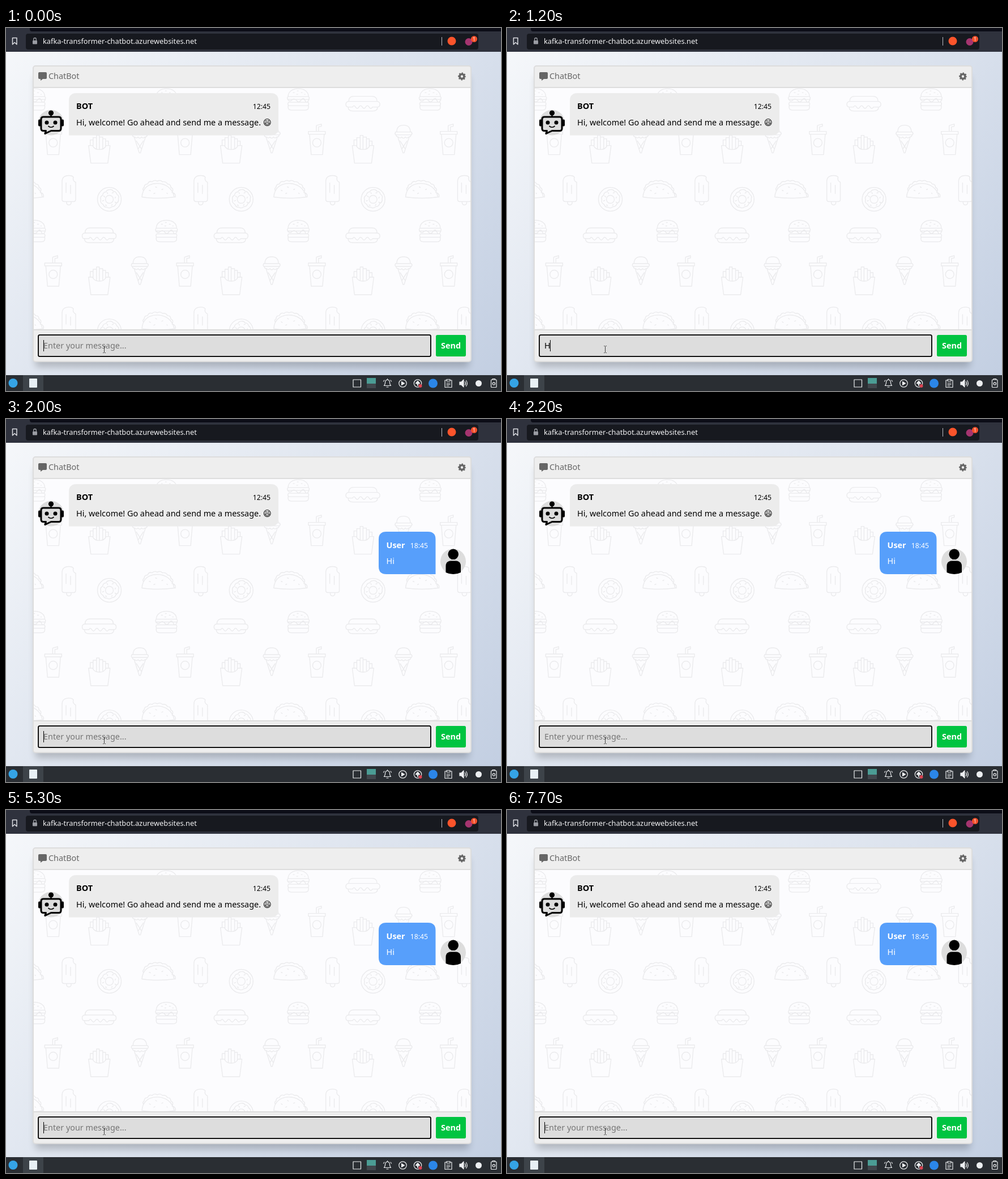
These frames come from a looping animation (874x641 px, 8000 ms). An HTML page:

```html
<!DOCTYPE html>
<html lang="en">
<head>
<meta charset="utf-8">
<title>ChatBot</title>
<style>
  html, body { margin: 0; width: 100%; height: 100%; overflow: hidden; background: #2a2e32; }
  svg { display: block; }
  text { font: 14.4px "Noto Sans", sans-serif; }
  .bold { font-weight: 700; }
  .time { font-size: 12.24px; text-anchor: end; }
  .emoji { font-family: "DejaVu Sans", sans-serif; }
  .line { fill: none; stroke-linecap: round; stroke-linejoin: round; }
</style>
</head>
<body>
<svg width="874" height="641" viewBox="0 0 874 641">
  <defs>
    <linearGradient id="sky" gradientUnits="userSpaceOnUse" x1="77" y1="-33" x2="797" y2="687">
      <stop offset="0" stop-color="#f5f7fa"/>
      <stop offset="1" stop-color="#c3cfe2"/>
    </linearGradient>
    <filter id="blur" x="-10%" y="-10%" width="120%" height="120%"><feGaussianBlur stdDeviation="6.5"/></filter>
    <clipPath id="chat"><rect x="49" y="106" width="771" height="426"/></clipPath>
    <g id="tile">
      <g transform="translate(283.3 358.5)">
        <path d="M-18-5C-18-14-10-19 0-19S18-14 18-5ZM-18-5q-3 3 0 5h36q3-2 0-5M-19 0q4 5 8 1t8 1 8-1 7 1 7-2M-17 5h34q3 3 0 6h-34q-3-3 0-6M-18 11h36v3q0 5-6 5h-24q-6 0-6-5Z"/>
        <path d="M-9-12h2M-2-15h2M5-12h2M-3-9h2M11-9h1"/>
      </g>
      <g transform="translate(164.5 366)">
        <path d="M-25-4q0-9 9-9h32q9 0 9 9M-24-4h48q6 0 6 5t-4 5q0 7-8 7h-36q-8 0-8-7-4 0-4-5t6-5Z"/>
        <path d="M-26 6h8q2-5 5 0t6 0 6 0 6 0 6 0 6 0h9"/>
      </g>
      <g transform="translate(83.3 429)">
        <path d="M-15-14h30v5h-30ZM-13-9l3 36h20l3-36M-1-14v-9q0-2 2-2l7-2v4l-5 1v8"/>
        <circle cy="6" r="7.5"/>
      </g>
      <g transform="translate(164.8 446)">
        <path d="M-19-6h7q3 7 12 7t12-7h7l-4 31h-30ZM-16-6v-10h5v11M-11-9v-11h6v20M-5-20v-4h5v25M0-21h6v21M6-18h5v14M11-14h5v8"/>
      </g>
      <g transform="translate(236.3 428)">
        <path d="M-12-12C-12-20-8-24 0-24S12-20 12-12M-14-12h28q2 3 0 5h-28q-2-2 0-5M-13-7q0 4 4 4 3 3 6 0 3 4 6 0 3 3 6 0 4 0 4-4M-10-3L-1 25h2L10-3M-6 4L3 18M6 4l-9 14"/>
      </g>
      <g transform="translate(111 285.5)">
        <path d="M-12 17v-31q0-11 12-11 6 0 8 3-2 6 4 9v30q0 4-4 4h-16q-4 0-4-4ZM-4 21v3q1 3 4 3t4-3v-3M-5-12v17M3-8v15"/>
      </g>
      <g transform="translate(182.5 302.5)">
        <circle r="21"/><circle r="7"/>
        <path d="M0-17q5-1 7 3 5 0 6 5 5 3 3 8 1 6-4 8-2 6-7 6-5 4-9 1-6 0-7-5-6-3-4-8-2-6 3-8 1-6 6-6 2-4 6-4Z"/>
        <path d="M-10-6l2 2M-4-12l1 2M5-11l2-1M11-4l-1 2M10 5l2 1M4 11l1-2M-5 11l-2-1M-12 3l2-1"/>
      </g>
      <g transform="translate(269 285.5)">
        <path d="M-29 13C-28-4-16-11-2-11S25-3 28 13q-28 4-57 0ZM-26 2q-3-4 1-6 0-6 6-6 2-6 8-4 4-4 9-1 6-3 9 1 7-1 9 4 6 0 6 6 5 2 3 7M24 5q7 1 6 8h-2"/>
        <path d="M-16 1l2 1M-5-5l2 1M6 0l2-1M15 6l1 1M-8 7l2-1"/>
      </g>
    </g>
  </defs>

  <!-- browser bar -->
  <rect width="874" height="42" fill="#2f323d"/>
  <path d="M42 0H874V6H46q-4 0-4-4Z" fill="#0c0d17"/>
  <rect x="35" y="10" width="799" height="28" rx="4" fill="#17191f"/>
  <path class="line" d="M11.5 17.5h7.5v11.5l-3.75-3.5-3.75 3.5Z" stroke="#dcdde2" stroke-width="1.5"/>
  <rect x="47" y="22" width="8" height="6.5" rx="1" fill="#9a9ca3"/>
  <path class="line" d="M48.7 22v-2q0-2.500 2.300-2.500t2.300 2.500v2" stroke="#9a9ca3" stroke-width="1.3"/>
  <text x="65" y="28" fill="#f4f4f6" style="font-size:12.8px">kafka-transformer-chatbot.azurewebsites.net</text>
  <path d="M769.5 16v15" stroke="#b9bbc2"/>
  <circle cx="787" cy="23" r="7.5" fill="#fb542b"/>
  <circle cx="817" cy="24.5" r="6.5" fill="#a5346f"/>
  <circle cx="826.5" cy="19.5" r="5.5" fill="#f4512c"/>
  <text x="826.5" y="22.5" fill="#fff" text-anchor="middle" style="font-size:8px">1</text>

  <!-- page and card -->
  <rect y="42" width="874" height="571" fill="url(#sky)"/>
  <rect x="51.5" y="84" width="766" height="515" rx="5" fill="#000" opacity=".2" filter="url(#blur)"/>
  <rect x="48" y="67" width="773" height="522" rx="4" fill="#eee" stroke="#ddd" stroke-width="2"/>
  <rect x="49" y="104" width="771" height="430" fill="#ddd"/>
  <rect x="49" y="106" width="771" height="426" fill="#fcfcfe"/>
  <g clip-path="url(#chat)"><g id="food" class="line" stroke="#ebebed" stroke-width="1.4"></g></g>

  <!-- header -->
  <path d="M59 78h11q2 0 2 2v8q0 2-2 2h-5l-4 3v-3h-2q-2 0-2-2v-8q0-2 2-2Z" fill="#666"/>
  <text x="75" y="90" fill="#666">ChatBot</text>
  <g transform="translate(805 85.5)" fill="none" stroke="#666">
    <circle r="4" stroke-width="3.6"/>
    <circle r="6" stroke-width="2" stroke-dasharray="2.356 2.356" stroke-dashoffset="1.178"/>
  </g>

  <!-- bot message -->
  <path d="M124.5 115h343q13.500 0 13.500 13.500V176q0 13.500-13.500 13.500H111V128.500q0-13.500 13.500-13.500Z" fill="#ececec"/>
  <text class="bold" x="124" y="143">BOT</text>
  <text class="time" x="467" y="143">12:45</text>
  <text x="124" y="172">Hi, welcome! Go ahead and send me a message. <tspan class="emoji">&#x1F604;&#xFE0E;</tspan></text>
  <circle cx="79.5" cy="167" r="22.5" fill="#ddd"/>
  <path d="M79.5 150v6" stroke="#000" stroke-width="2.5"/>
  <circle cx="79.5" cy="150" r="4.6"/>
  <rect x="57" y="161.500" width="5" height="12" rx="2"/>
  <rect x="97" y="161.500" width="5" height="12" rx="2"/>
  <path class="line" d="M66 157h27q4 0 4 4v16.500q0 4-4 4H79.500L69 186.500l1.500-5H66q-4 0-4-4v-16.500q0-4 4-4Z" stroke="#000" stroke-width="3"/>
  <circle cx="72" cy="167" r="3.5"/><circle cx="87" cy="167" r="3.5"/>
  <path class="line" d="M75 173.500q4.500 3.500 9 0" stroke="#000" stroke-width="1.7"/>

  <!-- user message -->
  <g id="reply">
    <path d="M671.5 199H745q13.500 0 13.500 13.500V274H671.500q-13.500 0-13.500-13.500V212.500q0-13.500 13.500-13.500Z" fill="#579ffb"/>
    <text class="bold" x="671.5" y="228" fill="#fff">User</text>
    <text class="time" x="745" y="228" fill="#fff">18:45</text>
    <text x="671.5" y="256" fill="#fff">Hi</text>
    <circle cx="789.5" cy="251.5" r="22.5" fill="#ddd"/>
    <circle cx="789.7" cy="238.8" r="9.3"/>
    <path d="M776.5 271V260q0-9.500 9.500-9.500h7.500q9.500 0 9.500 9.500V271q-6 3-13.250 3t-13.250-3Z"/>
  </g>

  <!-- input row -->
  <rect x="55" y="540" width="697" height="42" rx="4.5" fill="#fff"/>
  <rect x="57" y="542" width="693" height="38" rx="2.5" fill="#ddd" stroke="#101010" stroke-width="2"/>
  <text id="entry" x="66" y="566"></text>
  <rect id="caret" y="551" width="1" height="20"/>
  <path class="line" d="M171.5 561.5h1l1 1 1-1h1M173.5 562.5v10M171.5 573.5h1l1-1 1 1h1" stroke="#444"/>
  <rect x="759" y="542" width="53" height="38" rx="2.7" fill="#00c441"/>
  <text class="bold" x="785.5" y="566" fill="#fff" text-anchor="middle">Send</text>

  <!-- taskbar -->
  <rect y="613" width="874" height="28" fill="#2a2e33"/>
  <rect x="30" y="613" width="36" height="28" fill="#3d4349"/>
  <circle cx="12.5" cy="627" r="8" fill="#35a4e6"/>
  <rect x="41" y="619" width="14" height="16" rx="1" fill="#e8f0f5"/>
  <rect x="637" y="618" width="16" height="10" fill="#4b9c94"/>
  <rect x="637" y="628" width="16" height="8" fill="#41474d"/>
  <circle cx="754" cy="627.5" r="8" fill="#2b86e8"/>
  <circle cx="834.5" cy="627.5" r="5.5" fill="#eceef0"/>
  <g class="line" stroke="#eceef0" stroke-width="1.2">
    <rect x="613" y="621" width="13.5" height="13"/>
    <path d="M667.5 631.500q2-2 2-5 0-5 4-5.500 4 .5 4 5.500 0 3 2 5ZM672 634h3M668 622l-1.500 2M679 622l1.500 2M673.500 621v-1.500"/>
    <circle cx="700.5" cy="627.5" r="6.7"/>
    <path d="M698.5 624.500v6l5-3Z" fill="#eceef0"/>
    <circle cx="727" cy="627.5" r="6.7"/>
    <path d="M727 631v-6.500M724 627.500l3-3.500 3 3.500Z" fill="#eceef0" stroke-width="2"/>
    <path d="M777 622h-2v12.500h12V622h-2M778 620.500h6v3h-6ZM778 627h6M778 629.500h6M778 632h4"/>
    <path d="M801 625h3l4-4v13l-4-4h-3Z" fill="#eceef0"/>
    <path d="M810.5 624.500q2 3 0 6M812.500 622.500q3.500 5 0 10"/>
    <rect x="856.5" y="621" width="9.5" height="13.5" rx="1"/>
    <path d="M859 621v-1.500h4.500v1.500"/>
    <circle cx="861.3" cy="628" r="2.2"/>
  </g>
  <circle cx="731.5" cy="632" r="3" fill="#da4453"/>
</svg>
<script>
  const LOOP = 8000, STEP = { x: 232.8, y: 232.4 };
  const $ = id => document.getElementById(id);

  let tiles = "";
  for (let row = -1; row < 2; row++)
    for (let col = -1; col < 4; col++)
      tiles += `<use href="#tile" x="${col * STEP.x}" y="${row * STEP.y}"/>`;
  $("food").innerHTML = tiles;

  const SENT = 2000;
  const typing = [[0, "", 66], [1200, "H", 76], [1600, "Hi", 80], [SENT, "", 66]];
  // moments at which the caret turns on or off, starting from on
  const blinks = [300, 900, 2200, 4100, 4700, 5300, 5900, 6500, 7100, 7700];

  function draw(t) {
    const [, typed, caretX] = typing.filter(s => s[0] <= t).pop();
    const entry = $("entry"), label = typed || "Enter your message...";
    if (entry.textContent !== label) entry.textContent = label;
    entry.setAttribute("fill", typed ? "#000" : "#757575");
    $("caret").setAttribute("x", caretX);
    const on = blinks.filter(b => b <= t).length % 2 === 0;
    $("caret").setAttribute("visibility", on ? "visible" : "hidden");
    $("reply").setAttribute("visibility", t >= SENT ? "visible" : "hidden");
  }

  const start = performance.now();
  function tick() {
    draw((performance.now() - start) % LOOP);
    requestAnimationFrame(tick);
  }
  tick();
</script>
</body>
</html>
```
